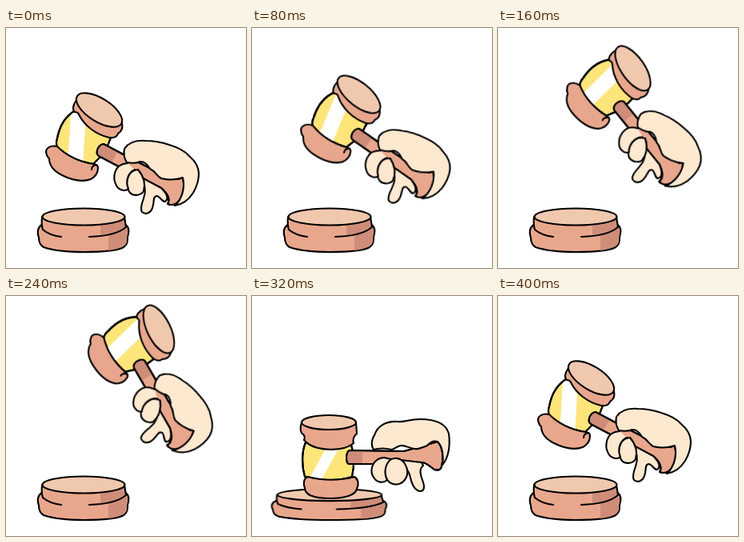
An HTML page without scripts that plays this animation: 300x300 px, repeating every 600 ms.

```html
<!DOCTYPE html>
<html lang="en">
<head>
<meta charset="utf-8">
<title>Gavel</title>
<style>
  html, body { margin: 0; width: 100%; height: 100%; overflow: hidden; background: #fff; }
  svg { display: block; width: 100vw; height: 100vh; }
  path, ellipse {
    stroke: #000; stroke-width: 2.1; stroke-linejoin: round; stroke-linecap: round;
    vector-effect: non-scaling-stroke;
  }
  .wood { fill: #e8a78d; }
  .top { fill: #f0c8ae; }
  .skin { fill: #fde8d0; }
  .brass { fill: #fde57a; }
  .shade { fill: #cf8d79; }
  .shine { fill: #fff; }
  .line { fill: none; }
  .flat { stroke: none; }

  .swing, .lean, .raised, .hit, .block { animation: 600ms step-end infinite; }
  .swing { transform-origin: 98px 137px; animation-name: swing; }
  .lean { transform-origin: 97px 141px; animation-name: lean; }
  .block { transform-origin: 97px 280px; animation-name: squash; }
  .raised { animation-name: raised; }
  .hit { visibility: hidden; animation-name: hit; }

  /* one pose every 40 ms, then a rest */
  @keyframes swing {
    0%, 66.6%, 100% { transform: none; }
    6.6%  { transform: translate(3px, -6px) rotate(2deg); }
    13.3% { transform: translate(13px, -22px) rotate(7deg); }
    19.9% { transform: translate(27px, -42px) rotate(15deg); }
    26.6% { transform: translate(40px, -62px) rotate(23deg); }
    33.3% { transform: translate(52px, -72px) rotate(28deg); }
    39.9% { transform: translate(59px, -76px) rotate(32deg); }
    46.6% { transform: translate(20px, -14px) rotate(2deg); }
    59.9% { transform: translate(-1px, 26px) rotate(-13deg); }
  }
  @keyframes lean {
    0%, 46.6%, 66.6%, 100% { transform: none; }
    6.6%  { transform: rotate(5deg); }
    13.3% { transform: rotate(12deg); }
    19.9%, 33.3% { transform: rotate(17deg); }
    26.6% { transform: rotate(19deg); }
    39.9%, 59.9% { transform: rotate(11deg); }
  }
  @keyframes squash {
    0%, 59.9%, 100% { transform: none; }
    53.3% { transform: scale(1.265, .715); }
  }
  @keyframes raised {
    0%, 59.9%, 100% { visibility: visible; }
    53.3% { visibility: hidden; }
  }
  @keyframes hit {
    0%, 59.9%, 100% { visibility: hidden; }
    53.3% { visibility: visible; }
  }
</style>
</head>
<body>
<svg viewBox="0 0 300 300">
  <defs>
    <path id="barrel" d="M87 103C74 110 67 122 64 138Q62 144 64 149C76 160 91 167 109 170C118 162 127 150 131 137Z"/>
    <path id="barrelHit" d="M67 183C62 195 62 212 66 226C85 232 110 231 125 226C128 212 128 198 124 186Z"/>
    <path id="handle" d="M122 145L160 165L205 188Q214 190 221 187C223 195 223 206 218 214C213 221 207 222 202 220C206 213 201 206 194 200L165 186L116 160C111 156 115 146 122 145Z"/>
    <path id="handleHit" d="M122 193C117 195 117 208 121 210L160 210L212 208C218 208 222 213 228 217Q236 219 237 213C240 200 238 188 232 182L190 194Z"/>
    <clipPath id="inBarrel"><use href="#barrel"/></clipPath>
    <clipPath id="inBarrelHit"><use href="#barrelHit"/></clipPath>
    <clipPath id="inHandle"><use href="#handle"/></clipPath>
    <clipPath id="inHandleHit"><use href="#handleHit"/></clipPath>
  </defs>

  <g class="block">
    <path class="wood" d="M46 245C39 249 39 256 41 262C41 267 42 271 47 274C59 278 78 280 97 280C120 280 140 278 147 274C152 271 152 266 152 261C154 255 154 248 148 245Z"/>
    <path class="shade flat" d="M128 259Q141 257 152 250L151 267Q150 275 128 278Z"/>
    <path class="wood flat" d="M45 236V251C60 261 130 264 150 249L148 236Z"/>
    <path class="shade flat" d="M118 245Q138 243 148 238L150 249Q138 258 118 260Z"/>
    <path class="line" d="M45 236Q44 246 46 252Q54 259 69 261M104 261Q137 260 150 249Q149 242 148 236"/>
    <ellipse class="top" cx="97" cy="236" rx="51.5" ry="10.5"/>
  </g>

  <g class="raised">
    <g class="swing">
      <use href="#barrel" class="brass"/>
      <g clip-path="url(#inBarrel)">
        <path class="shine flat lean" d="M82 90H101L95 190H76Z"/>
      </g>
      <use href="#barrel" class="line"/>
      <path class="wood" d="M64 148C56 146 50 150 50 155Q51 161 54 163C54 172 60 179 70 184C82 190 95 193 106 189Q115 184 115 175Q115 170 109 170C91 167 76 160 64 148Z"/>
      <path class="line" d="M113 171Q107 172 107 177"/>
      <path class="wood" d="M88 90C83 97 83 103 86 105Q90 105 91 108C98 122 112 133 129 137Q138 138 140 132Q147 128 145 119Z"/>
      <ellipse class="top" cx="116.5" cy="102.5" rx="32.5" ry="14.5" transform="rotate(32 116.5 102.5)"/>

      <use href="#handle" class="wood"/>
      <path class="shade flat" d="M110 138L140 154L130 172L105 160Z" clip-path="url(#inHandle)"/>
      <use href="#handle" class="line"/>
      <path class="skin" d="M168 186C175 196 175 205 172 213C169 221 168 227 170 230C175 234 181 231 183 225C186 217 183 211 188 210C193 210 194 217 199 217C204 213 201 207 194 200Z"/>
      <path class="skin" d="M165 177C150 178 148 198 155 206C160 211 169 209 172 204Q176 190 165 177"/>
      <path class="skin" d="M152 169C134 170 133 188 138 197C142 204 150 204 153 201C149 192 152 181 161 177"/>
      <path class="skin" d="M151 168Q146 160 148 151C153 143 163 140 175 141C186 141 195 143 204 146C214 149 223 153 229 160C236 166 241 174 241 182C241 191 238 199 234 206Q225 220 211 222C220 214 224 200 221 187C212 190 202 190 194 188C188 185 187 179 180 176Q175 167 168 167Q161 170 151 168Z"/>
    </g>
  </g>

  <g class="hit">
    <use href="#barrelHit" class="brass"/>
    <path class="shine flat" d="M98 180H114L84 235H68Z" clip-path="url(#inBarrelHit)"/>
    <use href="#barrelHit" class="line"/>
    <path class="wood" d="M70 226C64 228 64 235 66 240C66 250 82 253 98 253C115 253 130 249 131 241C134 235 133 229 128 226C110 231 88 231 70 226Z"/>
    <path class="wood" d="M62 158C60 164 60 171 64 173Q67 176 65 180C78 195 114 195 127 184Q125 177 131 172L130 158Z"/>
    <ellipse class="top" cx="96" cy="158" rx="34" ry="9"/>

    <use href="#handleHit" class="wood"/>
    <path class="shade flat" d="M110 190H138V214H110Z" clip-path="url(#inHandleHit)"/>
    <use href="#handleHit" class="line"/>
    <path class="skin" d="M186 205C190 215 196 216 198 227C200 236 204 243 210 244C216 244 216 238 213 230C210 222 209 216 214 212L212 208Z"/>
    <path class="skin" d="M178 203C165 204 163 220 168 228C172 236 182 238 189 232Q199 222 190 208Q185 202 178 203"/>
    <path class="skin" d="M165 202C151 203 147 217 151 225C155 233 163 235 169 230C164 220 167 209 174 204Z"/>
    <path class="skin" d="M152 192C148 186 150 178 153 174C157 162 168 156 182 157C190 158 196 154 210 154C228 154 242 158 246 172C248 186 246 202 238 211C240 200 238 188 232 182Q225 180 219 187C213 189 208 192 203 191C196 190 190 186 186 187C180 188 178 192 174 192Q163 189 152 192Z"/>
  </g>
</svg>
</body>
</html>
```
